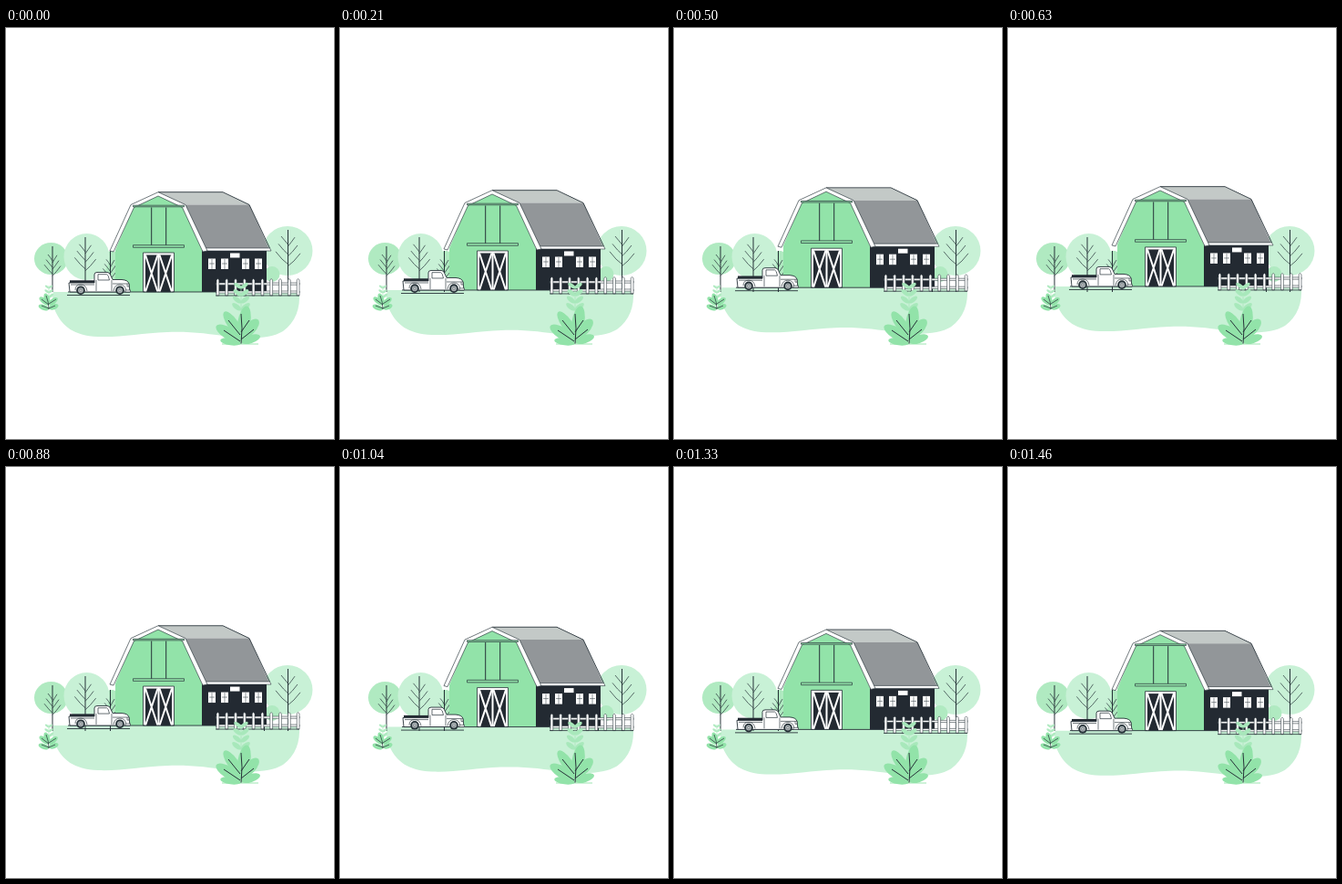
An HTML page with a canvas that plays this animation: 360x450 px, repeating every 1500 ms.

```html
<!DOCTYPE html>
<html lang="en">
<head>
<meta charset="utf-8">
<title>Barn</title>
<style>
html, body { margin: 0; width: 100%; height: 100%; overflow: hidden; background: #fff; }
canvas { display: block; width: 360px; height: 450px; }
</style>
</head>
<body>
<canvas id="stage"></canvas>
<script>
const canvas = document.getElementById('stage');
const ctx = canvas.getContext('2d');
const ratio = window.devicePixelRatio || 1;
canvas.width = 360 * ratio;
canvas.height = 450 * ratio;

const LOOP = 1500, LIFT = 7.2;
const INK = '#263238', WALL = '#232a32', WHITE = '#fff';
const GREEN = '#92e3a9', MID = '#b0eac1', PALE = '#c8f1d6';

function paint(path, fill, stroke, width = 0.8) {
  if (fill) { ctx.fillStyle = fill; ctx.fill(path); }
  if (stroke) { ctx.strokeStyle = stroke; ctx.lineWidth = width; ctx.stroke(path); }
}
const shape = (d, fill, stroke, width) => paint(new Path2D(d), fill, stroke, width);
const line = (d, width = 0.8, color = INK) => shape(d, null, color, width);

function box(x, y, w, h, fill, stroke, width) {
  const p = new Path2D();
  p.rect(x, y, w, h);
  paint(p, fill, stroke, width);
}
function oval(x, y, rx, ry, fill, stroke, width, turn = 0) {
  const p = new Path2D();
  p.ellipse(x, y, rx, ry, turn, 0, 7);
  paint(p, fill, stroke, width);
}
function raised(lift, ...parts) {
  ctx.save();
  ctx.translate(0, -lift);
  parts.forEach(part => part());
  ctx.restore();
}

function ground() {
  shape('M52 289H322C323 307 318 322 304 332C291 340 268 341 246 338' +
        'C222 335 203 332 177 333C148 334 126 339 101 338C74 337 62 326 55 312C51 304 50 297 52 289Z', PALE);
}

// Trunk with mirrored pairs of twigs.
function trunk(x, top, reach) {
  line(`M${x} ${top}V289`, 1);
  for (let i = 0; i < 3; i++) {
    const y = top + 13 + i * reach * 0.72, w = reach * (0.5 + i * 0.2);
    line(`M${x - w} ${y - w * 0.8}Q${x - w * 0.45} ${y - 1} ${x} ${y + 3}`, 0.7);
    line(`M${x + w} ${y - w * 0.65}Q${x + w * 0.45} ${y + 1} ${x} ${y + 5}`, 0.7);
  }
}
function trees() {
  oval(49.5, 252.5, 18.5, 17.5, MID);
  oval(116, 261, 11, 17, MID);
  oval(88.5, 250.5, 25, 25.5, PALE);
  oval(309, 244, 27.5, 27, PALE);
  oval(292, 269.5, 8.5, 8.5, MID);
  trunk(51, 239, 10);
  trunk(87, 229, 13);
  trunk(114.5, 244, 9);
  trunk(309.5, 221, 15);
  line('M283.5 262V289', 1);
}

function barnDoor() {
  box(150.5, 246, 34, 43, WHITE, INK, 0.8);
  for (const x of [153, 168.5]) {
    box(x, 248.5, 13.5, 40.5, WALL);
    line(`M${x} 248.5L${x + 13.5} 289M${x + 13.5} 248.5L${x} 289`, 2, WHITE);
  }
}
function barn() {
  box(215, 241, 71, 48, WALL);
  shape('M120 289V243L140 196L167 183L194 196L215 243V289Z', GREEN);

  shape('M167 180H238L267 193.5H196Z', '#c3c9c7');
  shape('M196 193.5H267L289 242H219Z', '#929699');
  shape('M218 241H289.5L291 244H219Z', WHITE, INK, 0.6);
  line('M167 179.7H238L267 193.5L289.5 241', 0.9);

  shape('M167 179.7L137 193.5L114 244L118 245L140.5 196.5L167 184L193.5 196.5L216 245L221 244L197 193.5Z',
        WHITE, INK, 0.65);

  box(139.5, 194.2, 56, 1.6, GREEN, INK, 0.7);
  line('M159.7 196.5V238M175.7 196.5V238', 1);
  box(139.5, 237.7, 56, 2.6, GREEN, INK, 0.7);
  barnDoor();

  box(246, 246.5, 10.5, 5, WHITE);
  for (const x of [222, 236, 259, 273]) {
    box(x, 252.5, 8, 11.5, WHITE);
    line(`M${x + 4} 253V264M${x + 1} 258H${x + 7}`, 0.5);
  }
  line('M68 289H232', 0.9);
}

function fence() {
  for (const y of [279, 288]) box(230.5, y, 91.5, 2.2, WHITE, INK, 0.55);
  for (let i = 0; i < 10; i++) {
    const x = 231 + i * 9.8;
    shape(`M${x} 293V276L${x + 1.4} 274.5L${x + 2.8} 276V293Z`, WHITE, INK, 0.55);
  }
  line('M230 293H322', 0.8);
}

function wheel(x) {
  oval(x, 287.2, 4.8, 4.8, INK);
  oval(x, 287.2, 3, 3, '#a9b0b3');
  oval(x, 287.2, 1.2, 1.2, WHITE, INK, 0.5);
}
function truck() {
  shape('M70 276.3H97V280H70Z', WALL);
  shape('M97 279V270Q97 267.5 100 267.5H111Q113.5 267.5 114.5 270L117 275.5H127Q134 276 135 280L136 289H70L69 279Z',
        WHITE, INK, 0.9);
  shape('M101 269.7H110.5Q112.5 270 113.5 276H101Z', WHITE, INK, 0.7);
  line('M99 276V288M116 276V288M117 280H133M71 281H97M76 287Q76 281 82 281T89 288M118 288Q119 281 125 281T132 288', 0.65);
  box(133, 280, 2, 3, WHITE, INK, 0.6);
  box(131, 287, 5.5, 2, WHITE, INK, 0.6);
  wheel(82);
  wheel(125);
  line('M67 292.5H136', 0.9);
}

function leaf(x, y, length, width, degrees, color) {
  const a = degrees * Math.PI / 180;
  oval(x + Math.cos(a) * length / 2, y + Math.sin(a) * length / 2, length / 2, width / 2, color, null, 0, a);
}
// Slender sprig with leaves in pairs.
function sprig(x, top, pairs, gap, size, color) {
  for (let i = 0; i < pairs; i++) {
    const y = top + i * gap, s = size * (0.72 + 0.28 * i / pairs);
    leaf(x, y, s, s * 0.45, -38, color);
    leaf(x, y, s, s * 0.45, 218, color);
  }
  line(`M${x} ${top - 3}V${top + pairs * gap}`, 0.8, color);
}
function plants() {
  sprig(47, 285, 3, 5, 7, MID);
  for (const [y, n, a] of [[303, 13, 218], [308, 12, 200], [303, 12, -38], [307, 11, -18], [302, 12, 250]])
    leaf(47, y, n, 6, a, GREEN);
  line('M47 308Q47 300 44 293M47 303L39 297M47 307L39 304M47 302L55 297M47 307L54 304', 0.7);

  sprig(258, 285, 4, 8, 13, '#a8e8bb');
  for (const [x, y, n, w, a] of [
    [258, 341, 37, 14, -80], [258, 337, 32, 12, 235], [258, 343, 32, 13, 212],
    [258, 345, 23, 8, 188], [258, 339, 27, 13, -46], [258, 344, 22, 9, -18]
  ]) leaf(x, y, n, w, a, GREEN);
  line('M258 346Q260 328 258 313M257 336L244 320M257 343L239 331M258 333L267 320M258 341L272 330', 1);
  line('M237 346H277', 0.9, GREEN);
}

function draw(now) {
  const phase = (now % LOOP) / LOOP;
  const lift = LIFT * (1 - Math.abs(2 * phase - 1));
  ctx.setTransform(ratio, 0, 0, ratio, 0, 0);
  ctx.fillStyle = WHITE;
  ctx.fillRect(0, 0, 360, 450);
  ctx.lineJoin = 'round';
  raised(lift, ground);
  trees();
  raised(lift, barn, fence, truck);
  plants();
}

const start = performance.now();
function tick() {
  draw(performance.now() - start);
  requestAnimationFrame(tick);
}
tick();
</script>
</body>
</html>
```
